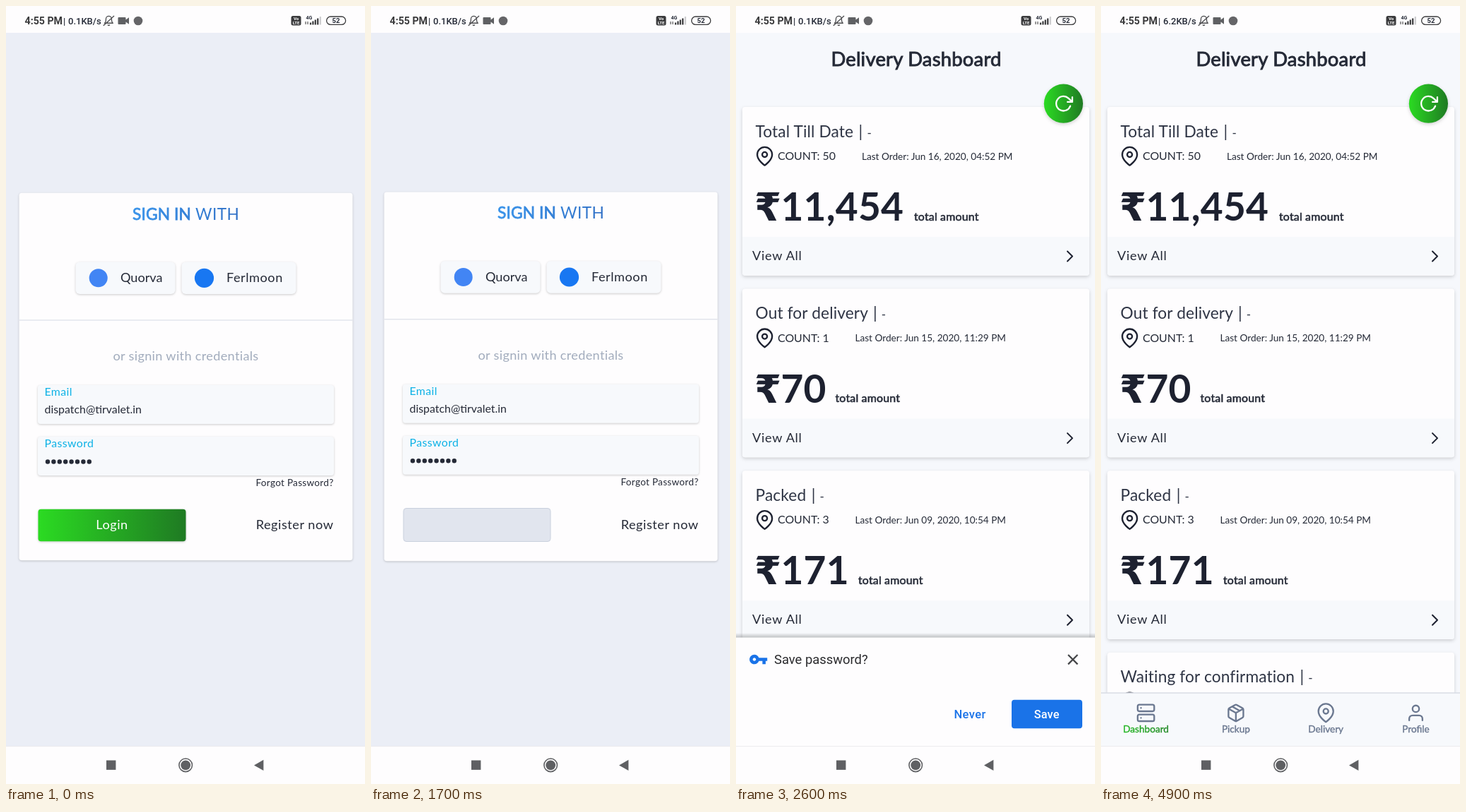
Write an HTML page that moves like this. It is 508 by 1102 pixels and loops after 5 s.

```html
<!DOCTYPE html>
<html lang="en">
<head>
<meta charset="utf-8">
<title>Delivery sign in</title>
<style>
html, body { margin: 0; width: 100%; height: 100%; overflow: hidden; background: #fefdfe; }
svg { display: block; }
text { font-family: Lato, sans-serif; fill: #252a37; white-space: pre; }
.ui text, text.ui { font-family: Roboto, sans-serif; }
.base { font-size: 18.14px; letter-spacing: .03em; }
.sm { font-size: 15.9px; letter-spacing: .025em; }
.xs { font-size: 13.6px; letter-spacing: .02em; }
.head { font-size: 22.7px; letter-spacing: .006em; }
.mid { text-anchor: middle; }
.end { text-anchor: end; }
.cyan { fill: #0db2e6; }
.bold { stroke: currentColor; stroke-width: .6px; }
.line { fill: none; stroke: currentColor; stroke-width: 2; stroke-linecap: round; stroke-linejoin: round; }
.white { fill: #fefdfe; }
.pale { fill: #f7f9fc; }
.soft { filter: drop-shadow(0 1px 1.5px rgba(0,0,0,.2)); }
.lift { filter: drop-shadow(0 2px 2.5px rgba(0,0,0,.17)); }

.anim, .anim * { animation-duration: 5s; animation-iteration-count: infinite; animation-timing-function: step-end; }
#login { animation-name: login; }
#dash { animation-name: dash; }
#panel { animation-name: panel; }
#upper { animation-name: nudge; }
#press { animation-name: press; animation-timing-function: ease-out; transform-box: fill-box; transform-origin: center; }
#green { animation-name: green; }
#busy { animation-name: busy; }
#tap { animation-name: tap; animation-timing-function: linear; }
#loading { animation-name: loading; }
#cards { animation-name: cards; }
#sheet { animation-name: sheet; animation-timing-function: linear; }
#offer { animation-name: offer; animation-timing-function: linear; }
#closing { animation-name: closing; }
#slow { animation-name: slow; }
#fast { animation-name: fast; }

@keyframes login { 0% { visibility: visible } 38%, 100% { visibility: hidden } }
@keyframes dash { 0% { opacity: 0 } 38%, 100% { opacity: 1 } }
@keyframes panel { 0% { y: 264.7px; height: 520.6px } 24%, 100% { y: 263.5px; height: 522.8px } }
@keyframes nudge { 0% { transform: none } 24%, 100% { transform: translateY(-1.3px) } }
@keyframes press { 0%, 22% { transform: none } 24%, 27% { transform: scale(.9) } 30%, 100% { transform: none } }
@keyframes green { 0% { opacity: 1 } 24%, 100% { opacity: 0 } }
@keyframes busy { 0% { opacity: 0 } 24%, 100% { opacity: 1 } }
@keyframes tap { 0%, 27% { opacity: 1 } 32%, 100% { opacity: 0 } }
@keyframes loading { 0% { opacity: 1 } 50%, 100% { opacity: 0 } }
@keyframes cards { 0% { opacity: 0 } 50%, 100% { opacity: 1 } }
@keyframes sheet {
  0%, 39.9% { transform: translateY(164px) }
  43.8%, 78% { transform: none }
  80% { transform: translateY(55px) }
  82% { transform: translateY(122px) }
  84%, 100% { transform: translateY(164px) }
}
@keyframes offer { 0%, 44.2% { opacity: 0 } 47%, 100% { opacity: 1 } }
@keyframes closing { 0% { opacity: 0 } 76%, 100% { opacity: 1 } }
@keyframes slow { 0% { opacity: 1 } 60%, 100% { opacity: 0 } }
@keyframes fast { 0% { opacity: 0 } 60%, 100% { opacity: 1 } }
</style>
</head>
<body>
<svg class="anim" width="508" height="1102" viewBox="0 0 508 1102">
  <defs>
    <linearGradient id="leaf"><stop stop-color="#2bdb22"/><stop offset="1" stop-color="#1f7a23"/></linearGradient>
    <linearGradient id="leafText"><stop stop-color="#27b927"/><stop offset="1" stop-color="#258a29"/></linearGradient>
    <linearGradient id="sky" gradientUnits="userSpaceOnUse" x1="179" x2="330"><stop stop-color="#3a94ea"/><stop offset="1" stop-color="#2f6fc6"/></linearGradient>
    <linearGradient id="shade" x2="0" y2="1"><stop stop-color="#000" stop-opacity="0"/><stop offset="1" stop-color="#000" stop-opacity=".24"/></linearGradient>
    <g id="pin"><path d="M21 10c0 7-9 13-9 13s-9-6-9-13a9 9 0 0 1 18 0z"/><circle cx="12" cy="10" r="3"/></g>
    <g id="server"><rect x="2" y="2" width="20" height="8" rx="2"/><rect x="2" y="14" width="20" height="8" rx="2"/><path d="M6 6h.01M6 18h.01"/></g>
    <path id="box" d="M21 16V8a2 2 0 0 0-1-1.73l-7-4a2 2 0 0 0-2 0l-7 4A2 2 0 0 0 3 8v8a2 2 0 0 0 1 1.73l7 4a2 2 0 0 0 2 0l7-4A2 2 0 0 0 21 16zM3.27 6.96L12 12.01l8.73-5.05M12 22.08V12M16.5 9.4l-9-5.19"/>
    <g id="user"><path d="M20 21v-2a4 4 0 0 0-4-4H8a4 4 0 0 0-4 4v2"/><circle cx="12" cy="7" r="4"/></g>
  </defs>

  <g id="login">
    <rect y="38" width="508" height="1011" fill="#ebeef6"/>
    <rect id="panel" class="white soft" x="18.5" y="264.7" width="472" height="520.6" rx="4"/>
    <g id="upper">
      <text x="179" y="302.5" class="head" style="fill:url(#sky);stroke:url(#sky);stroke-width:.8px;letter-spacing:.15px">SIGN IN</text>
      <text x="268" y="302.5" class="head" style="fill:url(#sky);letter-spacing:.4px">WITH</text>
      <rect class="pale soft" x="98.5" y="362.5" width="141" height="45.5" rx="6"/>
      <rect class="pale soft" x="248.5" y="362.5" width="162" height="45.5" rx="6"/>
      <circle cx="130.7" cy="385.3" r="13" fill="#4285f4"/>
      <circle cx="280.5" cy="385.3" r="13.6" fill="#1877f2"/>
      <text x="162" y="391" class="base" style="letter-spacing:0">Quorva</text>
      <text x="312" y="391" class="base">Ferlmoon</text>
      <path d="M18.5 445h472" stroke="#e2e5ec" stroke-width="1.4"/>
      <text x="254.5" y="502" class="base mid" style="fill:#a2acbd;letter-spacing:.018em">or signin with credentials</text>
      <rect class="pale soft" x="45" y="537" width="419" height="55" rx="4"/>
      <rect class="pale soft" x="45" y="610" width="419" height="55" rx="4"/>
      <text x="54.5" y="552" class="sm cyan">Email</text>
      <text x="54.5" y="577" class="sm" style="letter-spacing:0">dispatch@tirvalet.in</text>
      <text x="54.5" y="625" class="sm cyan">Password</text>
      <path d="M59 645.5h59.2" stroke="#252a37" stroke-width="6.4" stroke-linecap="round" stroke-dasharray="0 8.4"/>
      <text x="463.5" y="680" class="xs end">Forgot Password?</text>
    </g>
    <g id="press">
      <g id="green">
        <rect class="soft" x="45.5" y="712.7" width="209" height="45.6" rx="4" fill="url(#leaf)"/>
        <text x="150" y="741" class="base mid" style="fill:#fff">Login</text>
      </g>
      <g id="busy">
        <rect x="46" y="711.5" width="208" height="47" rx="4" fill="#e1e5ee" stroke="#c9d0dd"/>
        <rect id="tap" x="46" y="711.5" width="208" height="47" rx="3" fill="#9dd0e9" stroke="#8cc3df"/>
      </g>
    </g>
    <text x="463.5" y="741" class="base end">Register now</text>
  </g>

  <g id="dash">
    <rect y="38" width="508" height="1011" fill="#f6f8fc"/>
    <text x="255" y="85" class="mid bold" style="font-size:27.4px;letter-spacing:.008em;stroke:#252a37;stroke-width:.9px">Delivery Dashboard</text>
    <text id="loading" x="254.5" y="144" class="mid" style="font-size:18.6px">Loading........</text>
    <g id="cards"></g>
    <circle class="lift" cx="463.4" cy="138.2" r="27.6" fill="url(#leaf)"/>
    <path class="line" transform="translate(449.7 124.5) scale(1.14)" color="#fff" d="M23 4v6h-6M20.49 15a9 9 0 1 1-2.12-9.36L23 10"/>
    <g id="tabs">
      <rect class="pale" y="973" width="508" height="76"/>
      <path d="M0 973h508" stroke="#d9dde4" stroke-width="1.3"/>
    </g>
    <g id="sheet" class="ui">
      <rect y="888" width="508" height="7" fill="url(#shade)"/>
      <rect class="white" y="894.5" width="508" height="160"/>
      <g id="offer">
        <rect id="closing" x="445" y="895" width="63" height="62" fill="#dedee1"/>
        <path transform="translate(18 911.8) scale(1.14)" fill="#1a73e8" d="M12.65 10C11.83 7.67 9.61 6 7 6c-3.31 0-6 2.69-6 6s2.69 6 6 6c2.61 0 4.83-1.67 5.65-4H17v4h4v-4h2v-4H12.65zM7 14c-1.1 0-2-.9-2-2s.9-2 2-2 2 .9 2 2-.9 2-2 2z"/>
        <text x="54" y="931.5" style="font-size:18.4px;fill:#2b2b2e">Save password?</text>
        <path d="M470 919l13.4 13.4m0-13.4L470 932.4" stroke="#444548" stroke-width="2.2"/>
        <text x="331" y="1009" class="mid" style="font-size:16.5px;font-weight:500;letter-spacing:.4px;fill:#1a73e8">Never</text>
        <rect x="390" y="982.7" width="100" height="40.6" rx="4" fill="#1a73e8"/>
        <text x="439.7" y="1009" class="mid" style="font-size:16.3px;font-weight:500;letter-spacing:.2px;fill:#fff">Save</text>
      </g>
    </g>
  </g>

  <g class="ui">
    <rect class="white" width="508" height="38"/>
    <text x="26.5" y="26" style="font-size:14.2px;font-weight:700;fill:#3a3a3c">4:55 PM</text>
    <g style="font-size:13px;font-weight:500">
      <text x="81" y="25.5">|</text>
      <text id="slow" x="88" y="25.5">0.1KB/s</text>
      <text id="fast" x="88" y="25.5">6.2KB/s</text>
    </g>
    <path class="line" color="#4c4c4f" transform="translate(137.5 13) scale(.66)" d="M6 8a6 6 0 0 1 12 0c0 7 3 9 3 9H3s3-2 3-9M13.7 21a2 2 0 0 1-3.4 0M1 22L23 2"/>
    <path d="M159.5 16h9a1 1 0 0 1 1 1v2.5l4.5-3.3v9.6l-4.5-3.3V25a1 1 0 0 1-1 1h-9a1 1 0 0 1-1-1v-8a1 1 0 0 1 1-1z" fill="#5f6063"/>
    <circle cx="187" cy="21" r="6.3" fill="#656568"/>
    <rect x="403.5" y="14" width="14" height="13.5" rx="2.5" fill="#3a3a3c"/>
    <g style="font-size:6px;font-weight:700" class="mid">
      <text x="410.5" y="20.3" style="fill:#fff">Vo</text>
      <text x="410.5" y="26" style="fill:#fff">LTE</text>
      <text x="429" y="18.5" style="font-size:7px">4G</text>
    </g>
    <path d="M424 22v4m3-4v4" stroke="#555" stroke-width="1.2"/>
    <path d="M431 26.5v-3m3.4 3v-5m3.4 5v-7m3.4 7v-9" stroke="#3a3a3c" stroke-width="2.2"/>
    <path d="M444.8 26.5v-11.5" stroke="#c9c9cc" stroke-width="2"/>
    <rect x="453.6" y="15" width="27" height="11.4" rx="5.7" fill="none" stroke="#3a3a3c" stroke-width="1.3"/>
    <text x="467" y="24.2" class="mid" style="font-size:9.5px;font-weight:700">52</text>

    <rect class="white" y="1049" width="508" height="53"/>
    <path d="M0 1048.6h508" stroke="#ecebee"/>
    <g fill="#5f6063">
      <rect x="142" y="1068.5" width="13.4" height="13.4"/>
      <circle cx="254.2" cy="1075.3" r="6.9"/>
      <circle cx="254.2" cy="1075.3" r="9.3" fill="none" stroke="#5f6063" stroke-width="1.6"/>
      <path d="M351 1075.4l13.4-7.6v15.2z"/>
    </g>
  </g>
</svg>
<script>
const ink = '#1d2130';
const icon = (id, x, y, scale, color) =>
  `<use href="#${id}" class="line" color="${color}" transform="translate(${x} ${y}) scale(${scale}) translate(-12 -12)"/>`;

function card([title, count, last, amount, lastX, totalX], i) {
  return `<g transform="translate(0 ${143 + i * 257.6})">
    <rect class="white lift" x="9" width="491" height="238.7" rx="4"/>
    <path class="pale" d="M9 184h491v50.7a4 4 0 0 1-4 4H13a4 4 0 0 1-4-4z"/>
    <text x="27.5" y="42.7" class="head" style="fill:#2f3545">${title}<tspan dx="1.5"> |</tspan><tspan dx="1.5" font-size="17"> -</tspan></text>
    ${icon('pin', 40.6, 69.8, 1.17, ink)}
    <text x="59" y="75" class="sm" style="letter-spacing:0">COUNT: ${count}</text>
    <text x="${lastX}" y="74.5" class="xs" style="letter-spacing:0">Last Order: ${last}</text>
    <g font-size="55" font-weight="700">
      <text x="26" y="161" style="font-family:'DejaVu Sans',sans-serif;fill:${ink}">₹</text>
      <text x="63.5" y="161" style="fill:${ink};letter-spacing:.004em">${amount}</text>
    </g>
    <text x="${totalX}" y="160.7" class="sm bold" style="letter-spacing:.012em;stroke:#252a37">total amount</text>
    <text x="23" y="217" class="base" style="letter-spacing:.04em">View All</text>
    <path class="line" color="${ink}" d="M469 204.5l7 7-7 7"/>
  </g>`;
}

document.getElementById('cards').innerHTML = [
  ['Total Till Date', 50, 'Jun 16, 2020, 04:52 PM', '11,454', 178, 252],
  ['Out for delivery', 1, 'Jun 15, 2020, 11:29 PM', '70', 168.5, 140.5],
  ['Packed', 3, 'Jun 09, 2020, 10:54 PM', '171', 168.5, 173],
  ['Waiting for confirmation', 0, '', '0', 168.5, 110]
].map(card).join('');

document.getElementById('tabs').innerHTML += [
  ['server', 'Dashboard', 'url(#leafText)'], ['box', 'Pickup'], ['pin', 'Delivery'], ['user', 'Profile']
].map(([id, label, paint = '#6b7890'], i) => {
  const x = 63.6 + i * 127.3;
  return icon(id, x, 1001.3, 1.17, '#6b7890') +
    `<text x="${x}" y="1029" class="xs mid" style="letter-spacing:0;fill:${paint};stroke:${paint};stroke-width:.4px">${label}</text>`;
}).join('');
</script>
</body>
</html>
```
